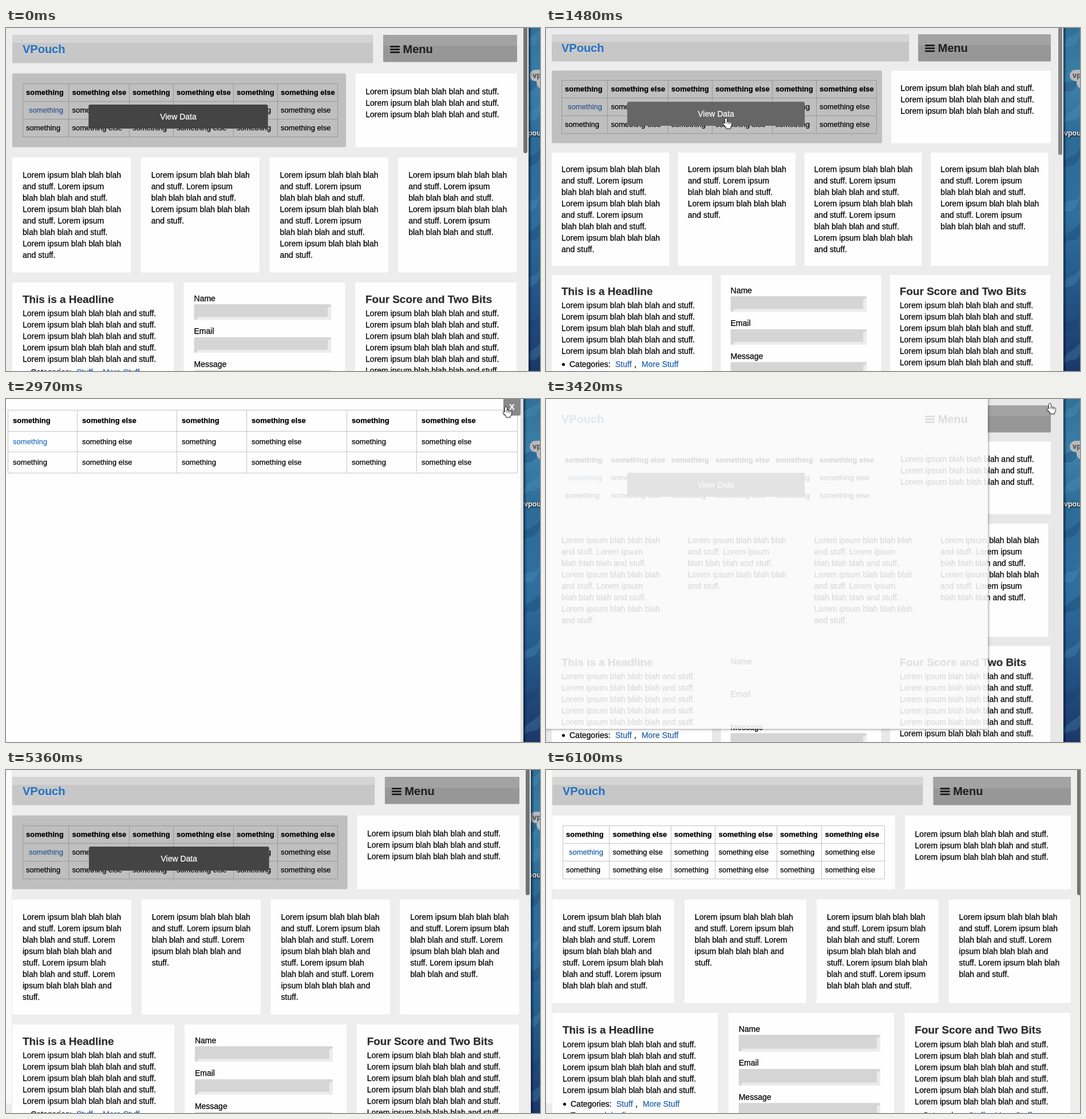
Write an HTML page with a canvas that moves like this. It is 933 px wide and 600 px high and loops after 7000 ms.

```html
<!DOCTYPE html>
<html lang="en">
<head>
<meta charset="utf-8">
<title>Responsive layout demo</title>
<style>
html, body { margin: 0; width: 100%; height: 100%; overflow: hidden; background: #ededed; }
canvas { display: block; width: 933px; height: 600px; }
</style>
</head>
<body>
<canvas id="stage" width="933" height="600"></canvas>
<script>
const ctx = document.getElementById('stage').getContext('2d');
const LOOP = 7000, W = 933, H = 600;
const FACE = '"Liberation Sans", Helvetica, Arial, sans-serif';
const SENTENCE = 'Lorem ipsum blah blah blah and stuff.';
const BRAND = 'VPouch', ICON = 'vpouc';
const LINK = '#1f62ab';

// ---------- helpers ----------
function box(x, y, w, h, color, r = 0) {
  ctx.fillStyle = color;
  ctx.beginPath();
  ctx.roundRect(x, y, w, h, r);
  ctx.fill();
}

// A hairline stroke gives the slightly heavier smoothing of desktop type.
function text(s, x, y, color = '#000', size = 14, weight = '', align = 'left') {
  ctx.font = `${weight} ${size}px ${FACE}`;
  ctx.textAlign = align;
  ctx.fillStyle = ctx.strokeStyle = color;
  ctx.lineWidth = 0.25;
  ctx.fillText(s, x, Math.floor(y));
  ctx.strokeText(s, x, Math.floor(y));
}

function clipped(x, y, w, h, draw) {
  ctx.save();
  ctx.beginPath();
  ctx.rect(x, y, w, h);
  ctx.clip();
  draw();
  ctx.restore();
}

function wrap(count, width) {
  ctx.font = `14px ${FACE}`;
  const lines = [];
  let line = '';
  for (const word of Array(count).fill(SENTENCE).join(' ').split(' ')) {
    const next = line ? line + ' ' + word : word;
    if (line && ctx.measureText(next).width > width) {
      lines.push(line);
      line = word;
    } else line = next;
  }
  return lines.concat(line);
}

function repeatLines(count, x, y) {
  for (let i = 0; i < count; i++) text(SENTENCE, x, y + i * 20);
}

// Latest entry whose time has been reached; entries are [time, ...values].
function latest(list, t) {
  let hit = null;
  for (const item of list) if (t >= item[0]) hit = item;
  return hit;
}

// ---------- desktop behind the window ----------
function desktop() {
  const g = ctx.createLinearGradient(0, 0, 0, H);
  [[0, '#33739b'], [0.16, '#3d85ad'], [0.32, '#2f6e9b'], [0.55, '#3072a2'],
   [0.75, '#265b8c'], [0.9, '#20467a'], [1, '#1c386a']].forEach(s => g.addColorStop(...s));
  ctx.fillStyle = g;
  ctx.fillRect(890, 0, 43, H);
  for (let i = 0; i < 9; i++) {
    const y = i * 70 - 20, bend = 25 * Math.sin(i * 2.1);
    ctx.beginPath();
    ctx.moveTo(898, y + 60);
    ctx.bezierCurveTo(908 + bend / 3, y + 20, 930, y + 50 + bend, 940, y);
    ctx.bezierCurveTo(930, y + 70, 918, y + 40 + bend, 898, y + 60);
    ctx.fillStyle = i % 2 ? 'rgba(22,60,105,.3)' : 'rgba(90,165,200,.25)';
    ctx.fill();
  }
  ctx.fillStyle = 'rgba(15,45,85,.14)';
  for (let y = 0; y < H; y += 3) ctx.fillRect(890, y, 43, 1);

  box(915, 73, 40, 20, '#b7babc', 10);
  box(927, 85, 30, 21, '#b7babc', 10);
  text('vp', 920, 87, '#555', 13, 'bold');
  ctx.save();
  ctx.shadowColor = '#000';
  ctx.shadowBlur = 3;
  ctx.shadowOffsetY = 1;
  text(ICON, 905, 188, '#fff', 12.5, 'bold');
  ctx.restore();
}

function windowEdge(edge) {
  const g = ctx.createLinearGradient(edge, 0, edge + 6, 0);
  g.addColorStop(0, 'rgba(0,10,30,.6)');
  g.addColorStop(1, 'rgba(0,10,30,0)');
  ctx.fillStyle = g;
  ctx.fillRect(edge, 0, 6, H);
}

// ---------- web page ----------
const WIDE = { left: 11, pad: 18, top: 12, barH: 49.5, menuH: 47.5, row2: 79.5, h2: 129, row3: 226.5, extra: 41,
  gap: 18, head: 0.7146, menu: 0.7347, table: 0.661, step4: 0.2548, card4: 0.235, step3: 0.3396, card3: 0.3197,
  slack: 35, base: 0, bg: '#ededed' };
const NARROW = { left: 10, pad: 17, top: 11, barH: 47.5, menuH: 47.5, row2: 74.5, h2: 127, row3: 218, extra: 38,
  gap: 16, head: 0.716, menu: 0.7342, table: 0.6617, step4: 0.2532, card4: 0.2351, step3: 0.3389, card3: 0.321,
  slack: 32.8, base: -1, bg: '#ececec' };

function layout(right) {
  const L = right > 884 ? WIDE : NARROW;
  return { ...L, right, edge: right + (L === WIDE ? 20 : 22), width: right - L.left, big: right > 914 };
}

function table(xs, ys, cells) {
  const last = xs.length - 1;
  if (cells.line) {
    ctx.fillStyle = cells.line;
    const [cx, cy] = [xs, ys].map(list => list.map(Math.floor));
    cx.forEach(x => ctx.fillRect(x, cy[0], 1, cy[3] - cy[0] + 1));
    cy.forEach(y => ctx.fillRect(cx[0], y, cx[last] - cx[0] + 1, 1));
  }
  for (let r = 0; r < 3; r++) for (let c = 0; c < last; c++) {
    const link = r === 1 && c === 0;
    text(c % 2 ? 'something else' : 'something', xs[c] + cells.pad + (link ? cells.indent : 0),
      ys[r] + cells.base, link ? cells.link : '#000', 13, r ? '' : 'bold');
  }
}

function field(x, y, w, h, light) {
  box(x, y, w, h, '#d5d5d5', 2);
  box(x + 5, y + h - 5, w - 5, 5, light, [4, 0, 0, 0]);
  box(x + w - 6, y + 4, 6, h - 4, light, [4, 0, 0, 0]);
}

function tags(x, y) {
  ctx.beginPath();
  ctx.arc(x + 3.5, y - 4.5, 2.6, 0, 7);
  ctx.fillStyle = '#000';
  ctx.fill();
  text('Categories:', x + 14, y);
  text('Stuff', x + 94, y, LINK);
  text(',', x + 127, y);
  text('More Stuff', x + 140, y, LINK);
  text('Tags:', x + 14, y + 20);
  text('plain, fictus', x + 66, y + 20, LINK);
}

// mode: 'full' paints everything, 'flat' leaves out the white cards, 'ghost' keeps text and button only
function page(L, mode = 'full', buttonColor = '#444') {
  const { left, pad, width, top, row2, row3, big, base } = L;
  const full = mode === 'full', solid = mode !== 'ghost';
  const card = (x, y, w, h) => full && box(x, y, w, h, '#fefefe');
  if (full) box(0, 0, L.edge, H, L.bg);

  // header
  const menuX = left + width * L.menu;
  const titleY = top + (left === 11 ? 32 : 31);
  if (solid) {
    const cut = left === 11 ? 14 : 13;
    box(left, top, width * L.head, L.barH, '#c7c7c7', 2);
    box(left, top, width * L.head, cut, '#d5d5d5', [2, 2, 0, 0]);
    const menuH = big ? L.barH : L.menuH;
    box(menuX, top, L.right - menuX, menuH, '#979797', 1);
    box(menuX, top, L.right - menuX, Math.round(menuH * 0.4), '#a3a3a3', 1);
    text(BRAND, left + pad, titleY + 1, 'rgba(255,255,255,.7)', 20, 'bold');
    text('Menu', menuX + 34.5, titleY + 1, 'rgba(255,255,255,.35)', 20, 'bold');
  }
  text(BRAND, left + pad, titleY, '#2b72bd', 20, 'bold');
  text('Menu', menuX + 34.5, titleY, '#222', 20, 'bold');
  for (let i = 0; i < 3; i++) box(menuX + 12, titleY - 13 + i * 5, 17, 3, '#222', 1);

  // table card
  const tableW = width * L.table;
  if (big) card(left, row2, tableW, L.h2);
  else if (solid) box(left, row2, tableW, L.h2, '#bfbfbf', 2);
  const cols = big ? [81.5, 107.5, 77.5, 107.5, 78.5, 110] : [80.5, 105.5, 77, 105, 77, 105.5];
  const xs = cols.reduce((a, w) => a.concat(a[a.length - 1] + w), [left + pad]);
  const y0 = row2 + (left === 11 ? 18 : 17.3);
  table(xs, [0, 31, 62, 93].map(d => y0 + d),
    { pad: 6, indent: 5, base: 20, line: solid && (big ? '#c4c4c4' : '#989898'), link: big ? LINK : '#30598f' });
  if (!big) {
    const bx = left + tableW * 0.2286, bw = tableW * 0.5375, by = Math.round(row2 + 54);
    box(bx, by, bw, 42, buttonColor, 3);
    text('View Data', bx + bw / 2, by + 26, '#fff', 14, '', 'center');
  }

  // side card
  const sideX = left + width * 0.68;
  card(sideX, row2, L.right - sideX, L.h2);
  repeatLines(3, sideX + pad - 0.5, row2 + (big ? 37.5 : 36.5 + base / 2));

  // four columns
  const w4 = width * L.card4;
  const room = left === 10 ? 172.3 : Math.max(172.3, w4 - L.slack);
  const wrapped = [5, 3, 5, 4].map(n => wrap(n, room));
  const h3 = wrapped[0].length * 20 + L.extra;
  wrapped.forEach((lines, i) => {
    const x = left + i * width * L.step4;
    card(x, row3, w4, h3);
    lines.forEach((s, k) => text(s, x + pad, row3 + 35.5 + base + k * 20));
  });

  // three columns
  const y = row3 + h3 + (left === 11 ? 17.5 : 16);
  const w3 = width * L.card3;
  const colX = i => left + i * width * L.step3;
  for (let i = 0; i < 3; i++) card(colX(i), y, w3, H);
  const lineY = y + (big ? 60 : 59 + base);
  [['This is a Headline', 0, 5], ['Four Score and Two Bits', 2, 6]].forEach(([title, i, n]) => {
    const x = colX(i) + pad;
    text(title, x, y + 36 + base, '#2d2d2d', 18.9, 'bold');
    repeatLines(n, x, lineY);
    tags(x, lineY + n * 20 + (big ? 4 : 3));
  });
  const fx = colX(1) + pad, pitch = big ? 59.6 : 57.6, fieldH = big ? 29 : 27;
  ['Name', 'Email', 'Message'].forEach((label, i) => {
    const fy = y + 33 + base + i * pitch;
    text(label, fx, fy);
    if (solid) field(fx, fy + 5.3, w3 - 42.3, i === 2 ? 80 : fieldH, full ? '#ececec' : '#fafafa');
  });
}

function scrollbar(edge, height, color) {
  box(edge - 9, -8, 7, height + 8, color, 4);
}

// ---------- overlay ----------
function overlay(bar) {
  box(0, 0, 904, H, '#fefefe');
  box(899, 0, 5, H, '#dedede');
  table([3, 124, 298, 420, 595, 717, 893], [19, 56, 92.6, 129],
    { pad: 9, indent: 0, base: 23, line: '#c6c6c6', link: '#2a72c4' });
  if (bar) scrollbar(904, 222, 'rgba(150,150,150,.6)');
  box(869, -4, 30, 33, '#898989', 3);
  text('X', 884, 19, '#fff', 14, 'bold', 'center');
}

function veil(L, w, h, opacity, shadow) {
  ctx.save();
  if (shadow) {
    ctx.shadowColor = 'rgba(0,0,0,.55)';
    ctx.shadowBlur = 5;
  }
  box(-10, -10, w + 10, h + 10, '#fbfbfb');
  ctx.restore();
  clipped(0, 0, w, h, () => {
    page(L, 'ghost');
    box(0, 0, w, h, `rgba(251,251,251,${opacity})`);
  });
}

// ---------- pointer ----------
const ARROW = 'M0 0V16L3.7 12.5L6.3 18.3L9 17L6.5 11.4H11.5Z';
const HAND = 'M0 1.5C0-.6 3-.6 3 1.5V7C3 5.5 6 5.6 6 7.3C6 6 8.6 6.2 8.6 8C8.6 7 11 7.1 11 9V12.5L9.3 15.3V17.5H2V15.5L-3 10.5C-4.4 8.8-2.3 7.5-1 8.8L0 9.8Z';
const shapes = { arrow: new Path2D(ARROW), hand: new Path2D(HAND) };

function pointer(kind, x, y) {
  const hand = kind === 'hand';
  ctx.save();
  ctx.translate(x, y);
  ctx.shadowColor = 'rgba(0,0,0,.35)';
  ctx.shadowBlur = 2;
  ctx.shadowOffsetY = 1;
  ctx.lineJoin = 'round';
  ctx.lineWidth = hand ? 1.3 : 2;
  ctx.strokeStyle = hand ? '#000' : '#fff';
  ctx.fillStyle = hand ? '#fff' : '#000';
  ctx.stroke(shapes[kind]);
  ctx.shadowColor = 'transparent';
  ctx.fill(shapes[kind]);
  if (hand) {
    ctx.lineWidth = 0.8;
    ctx.stroke(new Path2D('M3 6V9.5M6 7V10M8.6 8V10.5'));
  }
  ctx.restore();
}

const MOVES = [
  [590, 'arrow', 633, 395], [740, 'arrow', 575, 345], [890, 'arrow', 490, 283], [1030, 'arrow', 405, 224],
  [1180, 'arrow', 345, 182], [1330, 'hand', 320, 163], [1480, 'hand', 313, 158],
  [1930, 'arrow', 314, 155], [2230, 'arrow', 603, 154], [2520, 'arrow', 680, 118], [2670, 'arrow', 765, 75],
  [2820, 'arrow', 835, 38], [2970, 'hand', 872, 14], [3120, 'hand', 879, 8],
  [3870, 'arrow', 712, 252], [4020, 'arrow', 650, 390], [4170, '']
];
const WIDTHS = [
  [0, 893], [150, 888], [300, 882], [5360, 897], [5510, 901], [5660, 905],
  [5800, 909], [5950, 913], [6100, 917]
];
const HOVER = [[0, '#444'], [1180, '#4e4e4e'], [1330, '#5b5b5b'], [1480, '#666'], [3420, '#444']];

// ---------- timeline ----------
function draw(t) {
  const L = layout(latest(WIDTHS, t)[1]);
  const closing = t >= 3420 && t < 5360;
  if (closing) L.bg = '#e8e8e8';
  const color = latest(HOVER, t)[1];

  ctx.clearRect(0, 0, W, H);
  desktop();
  windowEdge(L.edge);

  if (t >= 2080 && t < 3420) overlay(t < 2230);
  else {
    clipped(0, 0, L.edge, H, () => page(L, 'full', color));
    if (!closing) scrollbar(L.edge, L.left === 11 ? 219 : 222, L.left === 11 ? '#737373' : '#858585');
  }

  if (t >= 1930 && t < 2080) veil(L, 772, 577, 0.87, true);
  if (t >= 3420 && t < 3570) veil(L, 772, 577, 0.87, true);
  if (t >= 3570 && t < 3720) veil(L, 779, 583, 0.5, false);
  if (t >= 3720 && t < 5360) {
    clipped(0, 0, 779, 583, () => {
      box(0, 0, 779, 583, '#fafafa');
      page(L, 'flat');
    });
    const fresh = () => page({ ...L, bg: '#eaeaea' });
    if (t >= 3870) clipped(711, 7, 179, 263, fresh);
    if (t >= 4020) clipped(648, 253, 72, 155, fresh);
  }
  if (t >= 5360) box(0, 0, 10, 583, '#fafafa');

  const move = latest(MOVES, t);
  if (move && move[1]) pointer(...move.slice(1));
}

const start = performance.now();
function tick() {
  draw((performance.now() - start) % LOOP);
  requestAnimationFrame(tick);
}
tick();
</script>
</body>
</html>
```
